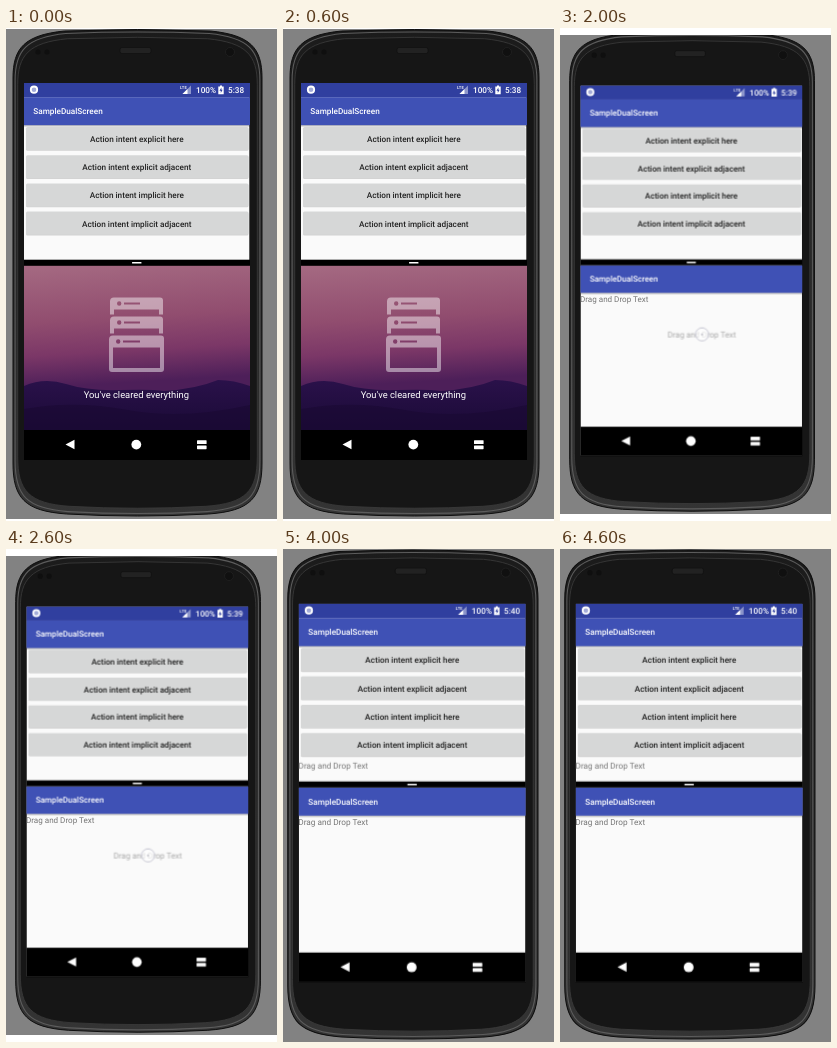
These frames come from a looping animation (271x493 px, 5000 ms). An HTML page:

```html
<!DOCTYPE html>
<html lang="en">
<head>
<meta charset="utf-8">
<title>Split screen drag and drop</title>
<style>
  html, body { margin: 0; width: 100%; height: 100%; overflow: hidden; background: #fff; }
  svg { display: block; width: 271px; height: 493px; background: #828282; }
  text { font: 500 8.2px Roboto, sans-serif; fill: #fff; text-rendering: geometricPrecision; }
  .mid { text-anchor: middle; }
  .label { fill: #222; text-anchor: middle; }
  .plain { fill: #757575; font-weight: 400; }

  /* Every change is a hard cut, once per second */
  #shot, #device, .cut { animation: 5s step-end infinite; }
  #shot { animation-name: crop; }
  #device { animation-name: place; }
  .home { animation-name: home; }
  .t39 { animation-name: t39; }
  .t40 { animation-name: t40; }
  .drag { animation-name: drag; }
  .drop { animation-name: drop; }
  .done { animation-name: done; }

  @keyframes crop {
    0% { clip-path: inset(1px 0 2px 0); }
    20% { clip-path: inset(2px 0 3px 0); }
    40% { clip-path: inset(7px 0 7px 0); }
    60% { clip-path: inset(1px 0 1px 0); }
    80%, 100% { clip-path: inset(0 0 0 0); }
  }
  @keyframes place {
    0% { transform: translate(18px, 55px) scale(1); }
    20% { transform: translate(17.7px, 55.4px) scale(.9965); }
    40% { transform: translate(20.5px, 57.6px) scale(.983); }
    60% { transform: translate(17.7px, 55.5px) scale(1.0015); }
    80%, 100% { transform: translate(15.8px, 54.8px) scale(1.005); }
  }
  @keyframes home { 0% { opacity: 1; } 20%, 100% { opacity: 0; } }
  @keyframes t39 { 0% { opacity: 0; } 20% { opacity: 1; } 60%, 100% { opacity: 0; } }
  @keyframes t40 { 0% { opacity: 0; } 60%, 100% { opacity: 1; } }
  @keyframes drag { 0% { opacity: 0; } 40% { opacity: 1; } 60%, 100% { opacity: 0; } }
  @keyframes drop { 0% { opacity: 0; } 60% { opacity: 1; } 80%, 100% { opacity: 0; } }
  @keyframes done { 0% { opacity: 0; } 80%, 100% { opacity: 1; } }
</style>
</head>
<body>
<svg id="shot" viewBox="0 0 271 493">
  <defs>
    <linearGradient id="rim" x1="0" y1="0" x2="0" y2="1">
      <stop offset="0" stop-color="#1b1b1b"/>
      <stop offset=".5" stop-color="#262626"/>
      <stop offset="1" stop-color="#343434"/>
    </linearGradient>
    <linearGradient id="sky" x1="0" y1="0" x2=".08" y2="1">
      <stop offset="0" stop-color="#a56a82"/>
      <stop offset=".35" stop-color="#914d6f"/>
      <stop offset=".55" stop-color="#7b3767"/>
      <stop offset=".74" stop-color="#4d1f59"/>
    </linearGradient>
    <linearGradient id="hill" x1="0" y1="0" x2="0" y2="1">
      <stop offset="0" stop-color="#2a114a"/>
      <stop offset="1" stop-color="#1a0a36"/>
    </linearGradient>
    <linearGradient id="shade" x1="0" y1="0" x2="0" y2="1">
      <stop offset="0" stop-color="#000" stop-opacity=".28"/>
      <stop offset="1" stop-color="#000" stop-opacity="0"/>
    </linearGradient>
    <clipPath id="screen"><rect width="225.3" height="376.5"/></clipPath>
    <!-- Phone outline, centred on the origin -->
    <path id="body" d="M-124.5 -195C-124.5 -225 -113 -238 -73 -242Q0 -245 73 -242C113 -238 124.5 -225 124.5 -195
      V190C124.5 225 113 238 71 241Q0 245 -71 241C-113 238 -124.5 225 -124.5 190Z"/>
    <g id="bar">
      <rect width="226" height="28" fill="#3f51b5"/>
      <rect y="28" width="226" height="2.2" fill="url(#shade)"/>
      <text x="9.3" y="16.8">SampleDualScreen</text>
    </g>
    <g id="button">
      <rect x="2" y=".8" width="222.5" height="23" rx="1.5" fill="#000" opacity=".16"/>
      <rect x="2" width="222.5" height="23" rx="1.5" fill="#d6d7d7"/>
    </g>
    <g id="head">
      <path fill-rule="evenodd" d="M4 0H50Q53 0 53 3V17H49V12H4V17H0V4Q0 0 4 0Z
        M7 6a2.2 2.2 0 1 0 4.4 0a2.2 2.2 0 1 0 -4.4 0Z M14 5H30V7H14Z"/>
    </g>
  </defs>

  <g id="device">
    <!-- Phone body -->
    <g transform="translate(113.5 190)">
      <use href="#body" fill="url(#rim)" stroke="#0e0e0e"/>
      <use href="#body" transform="scale(.983 .99)" fill="none" stroke="#5c5c5c" stroke-width="1.1"/>
      <use href="#body" transform="scale(.962 .968)" fill="#161616" stroke="#3a3a3a" stroke-width=".9"/>
    </g>
    <rect x="96" y="-35.5" width="31" height="6" rx="2" fill="#222" stroke="#0e0e0e" stroke-width=".6"/>
    <circle cx="206" cy="-31" r="4.5" fill="#101010" stroke="#222" stroke-width=".8"/>
    <circle cx="14" cy="-31" r="2.6" fill="#0f0f0f"/>
    <circle cx="23" cy="-31" r="2.6" fill="#0f0f0f"/>

    <g clip-path="url(#screen)">
      <rect width="226" height="376.5" fill="#fafafa"/>

      <!-- Upper app -->
      <rect class="cut drop" y="42" width="226" height="136" fill="#d1d1d1"/>
      <g transform="translate(0 44)">
        <use href="#button"/>
        <use href="#button" y="28.2"/>
        <use href="#button" y="56.4"/>
        <use href="#button" y="84.6"/>
      </g>
      <text class="label" x="112.8" y="59">Action intent explicit here</text>
      <text class="label" x="112.8" y="87.2">Action intent explicit adjacent</text>
      <text class="label" x="112.8" y="115.4">Action intent implicit here</text>
      <text class="label" x="112.8" y="143.6">Action intent implicit adjacent</text>
      <text class="plain cut done" x="-.5" y="163.5">Drag and Drop Text</text>
      <use href="#bar" y="14.2"/>

      <!-- Status bar -->
      <rect width="226" height="14.2" fill="#303f9f"/>
      <circle cx="10" cy="6.7" r="3.2" fill="#a3abd8" stroke="#fff" stroke-width="1.8"/>
      <text x="156" y="5.8" style="font-size:4.2px">LTE</text>
      <path d="M158.5 11L167 11V2.6Z" fill="#8d96cb"/>
      <path d="M158.5 11H163.5V6.1Z" fill="#fff"/>
      <text x="172" y="9.9">100%</text>
      <path d="M194.3 3.4H196V2.4H198V3.4H199.7V11.2H194.3Z" fill="#fff"/>
      <path d="M197.4 4.6L195.5 7.8H196.8V10L198.6 6.8H197.4Z" fill="#303f9f"/>
      <text class="cut home" x="204" y="9.9">5:38</text>
      <text class="cut t39" x="204" y="9.9">5:39</text>
      <text class="cut t40" x="204" y="9.9">5:40</text>

      <!-- Lower app -->
      <text class="plain" x="-.5" y="220.5">Drag and Drop Text</text>
      <use href="#bar" y="182.8"/>
      <g class="cut drag">
        <text class="plain" x="88.5" y="256" style="fill:#a6a6a6">Drag and Drop Text</text>
        <circle cx="123.6" cy="253" r="6.6" fill="#fff" fill-opacity=".65" stroke="#b4b4c4" stroke-width=".8"/>
        <circle cx="123.6" cy="253" r="1" fill="#b8b8c0"/>
      </g>

      <!-- Empty recents over wallpaper -->
      <g class="cut home">
        <rect y="182" width="226" height="166" fill="url(#sky)"/>
        <path d="M0 303Q20 294 42 301T96 307T140 308Q172 306 194 297Q210 297 226 303V348H0Z" fill="url(#hill)"/>
        <path d="M0 326Q50 317 104 327T226 322V348H0Z" fill="#190933" opacity=".6"/>
        <g fill="#fff" opacity=".46">
          <use href="#head" x="86" y="214.5"/>
          <use href="#head" x="86" y="233.5"/>
          <path fill-rule="evenodd" d="M89 252.5H137Q140 252.5 140 255.5V286Q140 289 137 289H88Q85 289 85 286V256.5Q85 252.5 89 252.5Z
            M89 264.5V285H136V264.5Z M92 258.5a2.2 2.2 0 1 0 4.4 0a2.2 2.2 0 1 0 -4.4 0Z M99 257.5H116V259.5H99Z"/>
        </g>
        <text class="mid" x="112.3" y="315" style="font-size:9.4px;font-weight:400">You've cleared everything</text>
      </g>

      <!-- Divider -->
      <rect y="176.7" width="226" height="6.1" fill="#000"/>
      <rect x="108" y="179.1" width="9.5" height="1.5" rx=".5" fill="#fff"/>

      <!-- Drop target -->
      <g class="cut drop">
        <circle cx="112.4" cy="110" r="21.3" fill="#fafafa"/>
        <text class="plain" x="90" y="114.5" opacity=".45">Drag and Drop Text</text>
        <g transform="translate(112.4 96.5)" fill="none" stroke="#222" stroke-width="1.2" stroke-linejoin="round">
          <path d="M0 0V14.5M-4.2 10.5L0 14.8L4.2 10.5"/>
          <path d="M-5.7 7.5H-9.2L-14.2 16V26.5H14.2V16L9.2 7.5H5.7"/>
          <path d="M-14.2 16H-7L-4.5 19.2H4.5L7 16H14.2"/>
        </g>
      </g>

      <!-- Navigation bar -->
      <rect y="347" width="226" height="30" fill="#000"/>
      <g fill="#fff">
        <path d="M41.5 361.5L50.5 356.8V366.2Z"/>
        <circle cx="112.3" cy="361.6" r="4.9"/>
        <rect x="173" y="357.2" width="9.6" height="3.8" rx=".6"/>
        <rect x="173" y="362.4" width="9.6" height="3.8" rx=".6"/>
      </g>
    </g>
  </g>
</svg>
</body>
</html>
```
